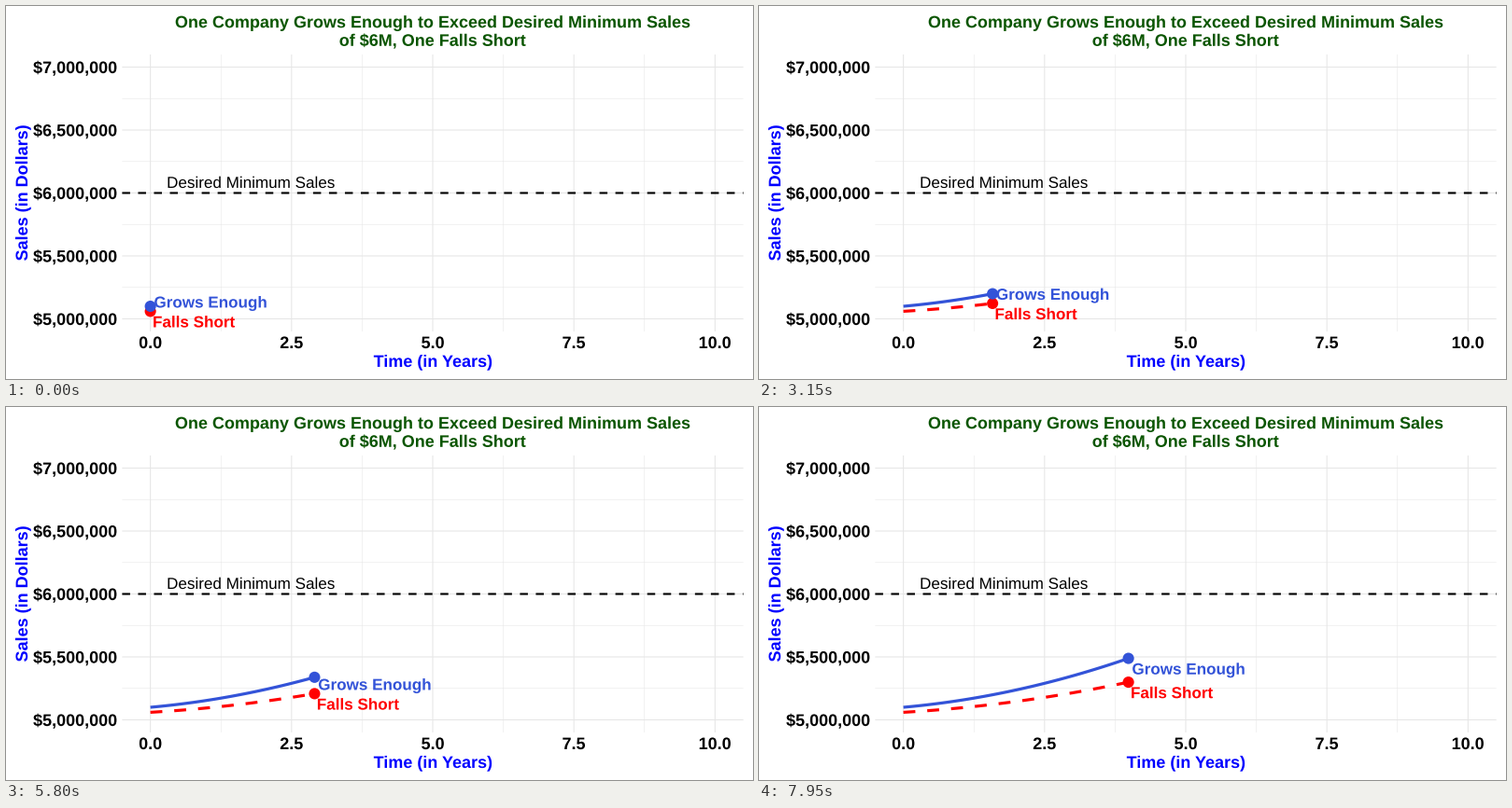
These frames come from a looping animation (800 px wide and 400 px high, 8000 ms). A matplotlib script:

```python
import numpy as np
import matplotlib.pyplot as plt
from matplotlib.animation import FuncAnimation
from matplotlib.patches import Circle, PathPatch
from matplotlib.textpath import TextPath
from matplotlib.transforms import Affine2D

W, H, DPI = 800, 400, 100
PT = 72 / DPI                      # points per pixel
FRAMES, STEP_MS = 160, 50
YEARS_PER_FRAME = 10 / 399

LEFT, RIGHT, TOP, BOTTOM = 124.4, 789.6, 52.0, 349.0
GREEN, AXIS_BLUE, BLUE, RED = "#0a5500", "#0000ff", "#3353d8", "#ff0000"
GRID = "#e6e6e6"

plt.rcParams["path.simplify"] = False
fig = plt.figure(figsize=(W / DPI, H / DPI), dpi=DPI, facecolor="white")
ax = fig.add_axes([0, 0, 1, 1])
ax.set_xlim(0, W)
ax.set_ylim(H, 0)
ax.axis("off")


def px(year):
    return LEFT + (year + 0.5) * (RIGHT - LEFT) / 11


def py(millions):
    return BOTTOM - (millions - 4.9) * (BOTTOM - TOP) / 2.2


def grows(t):
    return 5.1 + 0.0402 * t + 0.01437 * t**2


def falls(t):
    return 5.06 + 0.0262 * t + 0.0085 * t**2


def line(xs, ys, color, width, **kw):
    return ax.plot(xs, ys, color=color, lw=width * PT, snap=False,
                   solid_capstyle="butt", dash_capstyle="butt", **kw)[0]


class Label:
    """Text drawn as outlines, so it can sit between pixels."""

    def __init__(self, text, size, color, weight="bold", align=0.5, angle=0, z=5):
        path = TextPath((0, 0), text, size=size,
                        prop={"family": "Liberation Sans", "weight": weight})
        box = path.get_extents()
        self.shift = -(box.x0 + align * box.width)
        self.angle = angle
        self.patch = PathPatch(path, fc=color, lw=0, zorder=z, snap=False)
        ax.add_patch(self.patch)

    def at(self, x, y):
        move = (Affine2D().translate(self.shift, 0).scale(1, -1)
                .rotate_deg(-self.angle).translate(x, y))
        self.patch.set_transform(move + ax.transData)
        return self


# Grid
for i in range(9):
    width = 0.53 if i % 2 else 1.07
    x = px(1.25 * i)
    y = py(5 + 0.25 * i)
    line([x, x], [TOP, BOTTOM], GRID, width, zorder=width)
    line([LEFT, RIGHT], [y, y], GRID, width, zorder=width)

# Axis labels and titles
for i in range(5):
    Label(f"{2.5 * i:.1f}", 18, "black").at(px(2.5 * i), 367)
    value = 5_000_000 + 500_000 * i
    Label(f"${value:,}", 18, "black", align=1).at(118.4, py(value / 1e6) + 6.5)

Label("One Company Grows Enough to Exceed Desired Minimum Sales",
      18, GREEN).at(457, 23.2)
Label("of $6M, One Falls Short", 18, GREEN).at(457, 42.8)
Label("Time (in Years)", 18, AXIS_BLUE).at(457, 387)
Label("Sales (in Dollars)", 18, AXIS_BLUE, angle=90).at(23, 200.6)

# Threshold
line([LEFT, RIGHT], [py(6)] * 2, "black", 2.13, linestyle=(0, (4, 4)), zorder=2)
Label("Desired Minimum Sales", 17.07, "black", weight="normal").at(262.6, 195)

# Moving parts
red_line = line([], [], RED, 3.2, linestyle=(0, (4, 4)), zorder=2.1)
blue_line = line([], [], BLUE, 3.2, zorder=2.2)
red_dot = ax.add_patch(Circle((0, 0), 6.05, fc=RED, lw=0, zorder=3))
blue_dot = ax.add_patch(Circle((0, 0), 6.05, fc=BLUE, lw=0, zorder=3.1))
red_label = Label("Falls Short", 17.07, RED, align=0)
blue_label = Label("Grows Enough", 17.07, BLUE, align=0)


def update(frame):
    now = frame * YEARS_PER_FRAME
    t = np.linspace(0, now, 2 + frame)
    x, y_red, y_blue = px(now), py(falls(now)), py(grows(now))
    red_line.set_data(px(t), py(falls(t)))
    blue_line.set_data(px(t), py(grows(t)))
    red_dot.center = x, y_red
    blue_dot.center = x, y_blue

    # The upper label is pushed up while the two would overlap.
    base = y_red + 17.1
    red_label.at(x + 3.5, base)
    blue_label.at(x + 4.5, min(y_blue + 17.1, base - 21.1))
    return (red_line, blue_line, red_dot, blue_dot,
            red_label.patch, blue_label.patch)


anim = FuncAnimation(fig, update, frames=FRAMES, interval=STEP_MS,
                     init_func=lambda: update(0), repeat=True, repeat_delay=0)
plt.show()
```
